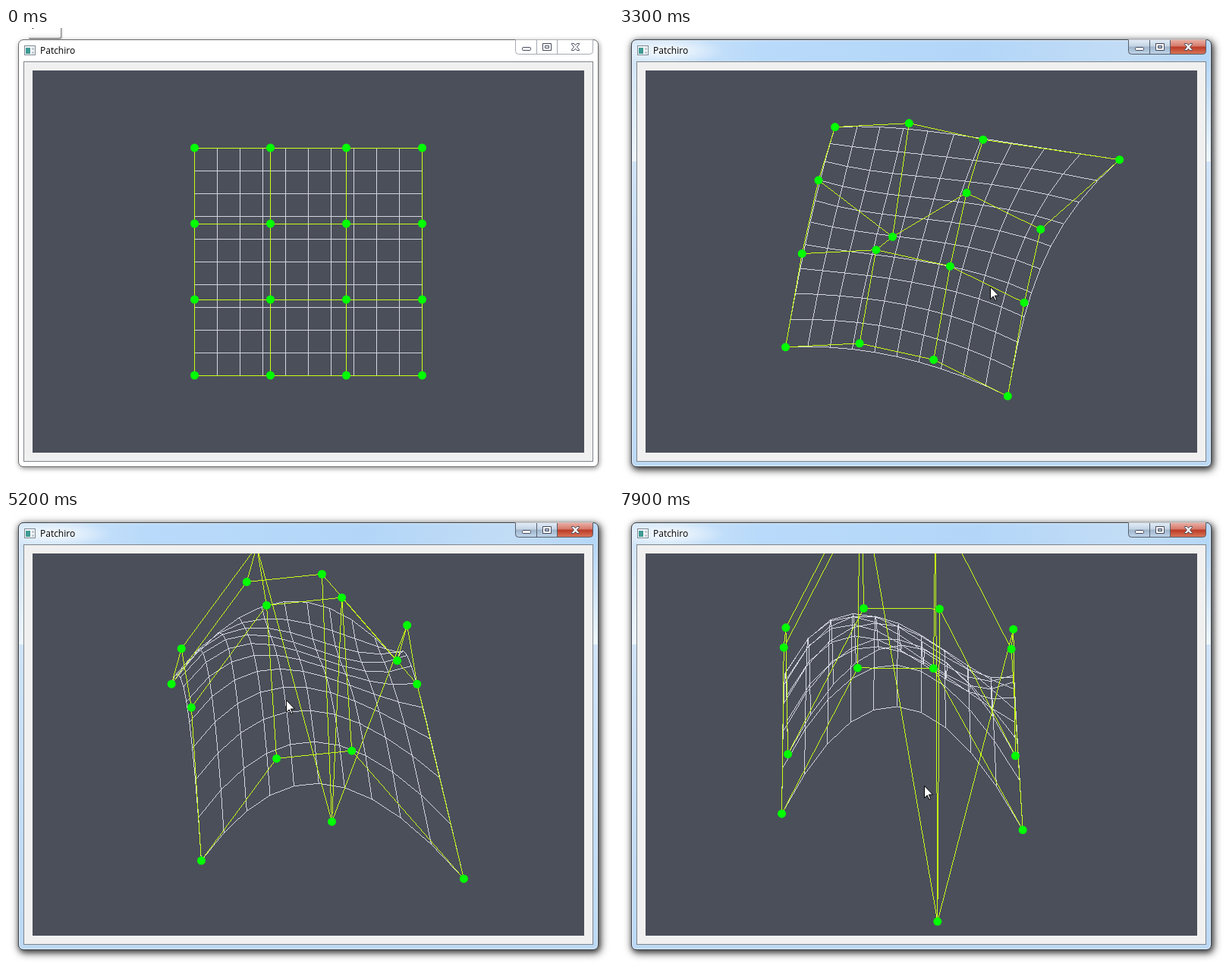
Recreate the animation shown at these times as an HTML page with a canvas. Size 800x600 px, loop 8000 ms.

```html
<!DOCTYPE html>
<html lang="en">
<head>
<meta charset="utf-8">
<title>Patchiro</title>
<style>
  html, body { margin: 0; width: 100%; height: 100%; overflow: hidden; background: #fff; }
  #stage { position: relative; width: 800px; height: 600px; overflow: hidden; background: #fff; }
  #stage > * { position: absolute; box-sizing: border-box; }
  .win { left: 16px; top: 15px; width: 765px; height: 564px; border: 1px solid #6b6b6b; border-radius: 7px; }
  .idle { background: #fff; box-shadow: 1px 2px 6px rgba(0, 0, 0, .42); }
  .live {
    border-color: #3c4652;
    box-shadow: inset 0 0 0 1px rgba(255, 255, 255, .6), 2px 3px 11px 1px rgba(0, 0, 0, .66);
    background:
      radial-gradient(ellipse 75px 18px at 48px 14px, rgba(255, 255, 255, .85), rgba(255, 255, 255, 0)),
      linear-gradient(rgba(238, 246, 254, 0) 30px, #eef6fe 160px, #cfe3f8 160px, #bcd9f4 555px),
      linear-gradient(90deg, #d3e6f8, #b9dafa 22%, #b3d6f8 60%, #c2dcf5 85%, #b5d7f7);
  }
  #client { left: 23px; top: 44px; width: 751px; height: 528px; border: 1px solid #7f858c; background: #f0f0f0; }
  #view { left: 35px; top: 56px; }
  #title { left: 45px; top: 21px; font: 12px/17px "Open Sans", "Noto Sans", sans-serif; color: #000; white-space: nowrap; }
  #tab {
    left: 30px; top: -4px; width: 43px; height: 18px; border: solid #8a8a8a; border-width: 0 1px 1px 0;
    border-radius: 0 0 3px 0; background: linear-gradient(#fff 60%, #f1f1f1); box-shadow: 1px 1px 2px rgba(0, 0, 0, .3);
  }
  svg { left: 0; top: 0; }
</style>
</head>
<body>
<div id="stage">
  <div id="tab"></div>
  <div class="win idle"></div>
  <div class="win live fade"></div>
  <div id="client"></div>
  <div id="title">Patchiro</div>
  <canvas id="view" width="727" height="504"></canvas>
  <svg width="800" height="600" viewBox="0 0 800 600">
    <defs>
      <linearGradient id="steel" x2="0" y2="1">
        <stop offset="0" stop-color="#e3edf7"/><stop offset=".45" stop-color="#c3d3e3"/>
        <stop offset=".5" stop-color="#9fb5cb"/><stop offset="1" stop-color="#bfd5ea"/>
      </linearGradient>
      <linearGradient id="red" x2="0" y2="1">
        <stop offset="0" stop-color="#e9b0a4"/><stop offset=".45" stop-color="#d5786a"/>
        <stop offset=".5" stop-color="#bb3a26"/><stop offset="1" stop-color="#d9775a"/>
      </linearGradient>
      <path id="bar" d="M671.5 15.5V30.5Q671.5 34.5 675.5 34.5H769.5Q773.5 34.5 773.5 30.5V15.5"/>
      <g id="signs" stroke="#454a5c">
        <rect x="680.5" y="25.5" width="11" height="4" rx="1"/>
        <path fill-rule="evenodd" d="M707.5 20.5H718.5V29.5H707.5ZM710.5 23.5H715.5V26.5H710.5Z"/>
        <path d="M745.5 20.5H748.5L750.5 22.8 752.5 20.5H755.5V21.5L752.5 25 755.5 28.5V29.5H752.5L750.5 27.2 748.5 29.5H745.5V28.5L748.5 25 745.5 21.5Z"/>
      </g>
    </defs>
    <g>
      <rect x="24.5" y="23.5" width="14" height="12" fill="#f4f6f8" stroke="#7d8894"/>
      <rect x="26" y="26" width="6" height="8" fill="#3f9a94"/>
      <path d="M34 26h3v3h-3zM34 31h3v3h-3z" fill="#c3cbd4"/>
    </g>
    <g fill="#fff">
      <use href="#bar" stroke="#a4a9b2"/>
      <path d="M699.5 16V34M726.5 16V34" stroke="#a4a9b2"/>
      <use href="#signs"/>
    </g>
    <g class="fade">
      <use href="#bar" fill="url(#steel)"/>
      <path d="M726.5 15.5H773.5V30.5Q773.5 34.5 769.5 34.5H726.5Z" fill="url(#red)"/>
      <use href="#bar" fill="none" stroke="#56606e"/>
      <path d="M699.5 16V34M726.5 16V34" stroke="#56606e"/>
      <use href="#signs" fill="#fff"/>
    </g>
    <path id="arrow" d="M.5.5V16.5L4.3 12.9 6.8 18.5 8.8 17.6 6.4 12H11.5Z" fill="#fff" stroke="#000"/>
  </svg>
</div>
<script>
const LOOP = 8000, STEP = 100, N = 10, UNIT = 100;
const TURN = .58 * Math.PI / 180; // radians per dragged pixel
const $ = q => document.querySelector(q);
const ctx = $('#view').getContext('2d');
const fades = document.querySelectorAll('.fade');

// What a drag by (dx, dy) does to the scene
const orbit = (s, dx, dy) => {
  s.spin -= dx * TURN;
  s.tilt -= dy * TURN;
};
const pan = (s, dx, dy) => {
  s.px += dx;
  s.py += dy;
};
const pull = (s, dx, dy) => {
  const u = dx / UNIT, v = dy / UNIT / Math.cos(s.tilt);
  s.x += Math.cos(s.spin) * u + Math.sin(s.spin) * v;
  s.y += Math.cos(s.spin) * v - Math.sin(s.spin) * u;
};

// Pointer moves: first step, last step, goal, drag
const moves = [
  [0, 9, 422, 347],
  [9, 19, 549, 158],
  [24, 26, 624.5, 119, pull],
  [27, 31, 510.2, 354.1],
  [31, 36, 456.1, 321.3, orbit],
  [36, 43, 368, 290, orbit],
  [47, 48, 368, 287.8, orbit],
  [48, 50, 381, 228],
  [50, 55, 351, 281, pan],
  [56, 61, 582, 512],
  [62, 66, 562.5, 512, pull],
  [66, 68, 418, 424.7],
  [69, 71, 409, 418, orbit],
  [71, 78, 400, 362.8, orbit],
  [78, 79, 402.4, 362, orbit]
];

const clamp = p => Math.min(1, Math.max(0, p));

// Replays the moves up to step t; drags run evenly, free moves slow down
function scene(t) {
  const s = { mx: 28, my: -18, spin: 0, tilt: 0, px: 0, py: 0, x: 1.5, y: -1.5 };
  for (const [from, to, x, y, drag] of moves) {
    if (t < from) break;
    const p = clamp((t - from) / (to - from));
    const k = drag ? p : 1 - (1 - p) ** 2.2;
    const dx = (x - s.mx) * k, dy = (y - s.my) * k;
    if (drag) drag(s, dx, dy);
    s.mx += dx;
    s.my += dy;
    if (p < 1) break;
  }
  return s;
}

const bernstein = t => {
  const s = 1 - t;
  return [s * s * s, 3 * s * s * t, 3 * s * t * t, t * t * t];
};
const weights = Array.from({ length: N + 1 }, (_, i) => bernstein(i / N));

const inner = k => k === 1 || k === 2 ? 2 : 0;
const grid = make => [0, 1, 2, 3].map(r => [0, 1, 2, 3].map(c => make(r, c)));

function cage(s) {
  const sin = Math.sin(s.spin), cos = Math.cos(s.spin);
  return grid((r, c) => {
    let x = c - 1.5, y = r - 1.5, z = inner(r) + inner(c);
    if (r === 1 && c === 1) z = -2;
    if (r === 0 && c === 3) ({ x, y } = s);
    const depth = sin * x + cos * y;
    return [
      363.5 + s.px + UNIT * (cos * x - sin * y),
      252 + s.py + UNIT * (depth * Math.cos(s.tilt) - z * Math.sin(s.tilt))
    ];
  });
}

// The projection is affine, so the patch can be evaluated on screen points
function patch(pts) {
  return weights.map(wr => weights.map(wc => {
    let x = 0, y = 0;
    pts.forEach((row, r) => row.forEach((p, c) => {
      const w = wr[r] * wc[c];
      x += w * p[0];
      y += w * p[1];
    }));
    return [x, y];
  }));
}

// One pixel wide line without smoothing, sampled at pixel centres
function line(a, b) {
  const m = Math.abs(b[0] - a[0]) >= Math.abs(b[1] - a[1]) ? 0 : 1, o = 1 - m;
  if (a[m] > b[m]) [a, b] = [b, a];
  const slope = (b[o] - a[o]) / (b[m] - a[m] || 1);
  for (let i = Math.ceil(a[m] - .5); i < b[m] - .5; i++) {
    const j = Math.floor(a[o] + (i + .5 - a[m]) * slope + 1e-6);
    if (m) ctx.fillRect(j, i, 1, 1);
    else ctx.fillRect(i, j, 1, 1);
  }
}

function net(pts, color) {
  ctx.fillStyle = color;
  pts.forEach((row, r) => row.forEach((p, c) => {
    if (row[c + 1]) line(p, row[c + 1]);
    if (pts[r + 1]) line(p, pts[r + 1][c]);
  }));
}

function draw(t) {
  const s = scene(t), pts = cage(s);
  ctx.fillStyle = '#4b4f5a';
  ctx.fillRect(0, 0, 727, 504);
  net(patch(pts), '#d3d6df');
  net(pts, '#c8ff14');
  ctx.fillStyle = '#0f0';
  for (const [x, y] of pts.flat()) {
    ctx.beginPath();
    ctx.arc(x, y, 5.5, 0, 7);
    ctx.fill();
  }
  $('#arrow').setAttribute('transform', `translate(${Math.round(s.mx)} ${Math.round(s.my)})`);
  $('#tab').style.display = t < 1 ? '' : 'none';
  fades.forEach(e => { e.style.opacity = clamp((t - 20) / 3); });
}

let start, last = -1;
function tick(now) {
  if (start === undefined) start = now;
  const t = Math.floor((now - start) % LOOP / STEP);
  if (t !== last) draw(last = t);
  requestAnimationFrame(tick);
}
draw(0);
requestAnimationFrame(tick);
</script>
</body>
</html>
```
